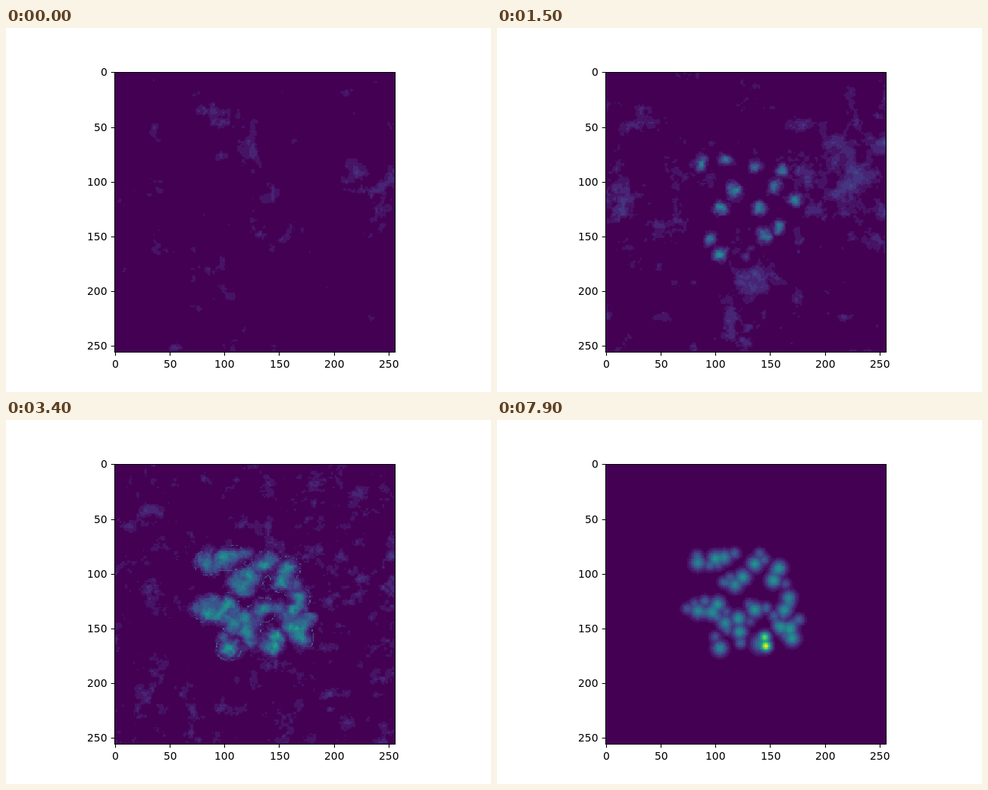
Animation, 640 px wide and 480 px high, one loop 8 s. Source, as an HTML page with a canvas:

```html
<!DOCTYPE html>
<html lang="en">
<head>
<meta charset="utf-8">
<title>Heatmap</title>
<style>
  html, body { margin: 0; width: 100%; height: 100%; overflow: hidden; background: #fff; }
  canvas { position: absolute; left: 143.2px; top: 57.6px; width: 369.6px; height: 369.6px; image-rendering: pixelated; }
  svg { position: absolute; left: 0; top: 0; }
  text { font: 13.89px "DejaVu Sans", sans-serif; fill: #000; }
  path { fill: none; stroke: #000; stroke-width: 1.11; }
</style>
</head>
<body>
<canvas id="map" width="256" height="256"></canvas>
<svg id="axes" width="640" height="480" viewBox="0 0 640 480"></svg>
<script>
const N = 256, STEP = 100, LOOP = 8000;

const palette = ('440154 471365 482475 463480 414487 3b528b 355f8d 2f6c8e 2a788e 25848e 21918c ' +
  '1e9c89 22a884 2fb47c 44bf70 5ec962 7ad151 9bd93c bddf26 dfe318 fde725')
  .split(' ').map(hex => [0, 2, 4].map(i => parseInt(hex.slice(i, i + 2), 16)));

function randomizer(seed) {
  return () => {
    seed = (seed + 0x6d2b79f5) | 0;
    let h = Math.imul(seed ^ (seed >>> 15), 1 | seed);
    h = (h + Math.imul(h ^ (h >>> 7), 61 | h)) ^ h;
    return ((h ^ (h >>> 14)) >>> 0) / 4294967296;
  };
}

// Layered value noise with zero mean and unit deviation
function cloud(seed, scale) {
  const random = randomizer(seed), field = new Float32Array(N * N);
  const ease = u => u * u * (3 - 2 * u);
  for (let wave = scale, weight = 1; wave > 1.5; wave /= 2, weight *= 0.7) {
    const size = Math.ceil(N / wave) + 2;
    const grid = Float32Array.from({ length: size * size }, () => random() + random() - 1);
    for (let y = 0; y < N; y++) {
      const gy = y / wave, row = Math.floor(gy), v = ease(gy - row);
      for (let x = 0; x < N; x++) {
        const gx = x / wave, col = Math.floor(gx), u = ease(gx - col), i = row * size + col;
        const top = grid[i] + (grid[i + 1] - grid[i]) * u;
        const low = grid[i + size] + (grid[i + size + 1] - grid[i + size]) * u;
        field[y * N + x] += weight * (top + (low - top) * v);
      }
    }
  }
  const mean = field.reduce((a, b) => a + b, 0) / field.length;
  const dev = Math.sqrt(field.reduce((a, b) => a + (b - mean) ** 2, 0) / field.length);
  return field.map(v => (v - mean) / dev);
}

const warpX = cloud(71, 14), warpY = cloud(72, 14);

// Soft union of round spots [x, y, radius, height], displaced by the warp fields
function spots(list, rough) {
  const field = new Float32Array(N * N);
  for (const [cx, cy, r, height = 1] of list) {
    const reach = Math.ceil(2 * r + 3 * rough);
    const left = Math.max(0, Math.floor(cx - reach)), right = Math.min(N, cx + reach);
    for (let y = Math.max(0, Math.floor(cy - reach)); y < Math.min(N, cy + reach); y++) {
      for (let x = left; x < right; x++) {
        const i = y * N + x;
        const dx = x - cx + rough * warpX[i], dy = y - cy + rough * warpY[i];
        field[i] += height ** 3 * Math.exp(-3 * (dx * dx + dy * dy) / (r * r));
      }
    }
  }
  return field.map(Math.cbrt);
}

// Spots strung evenly along a polyline
function stroke(points) {
  const list = [[...points[0], 6, .4]];
  points.slice(1).forEach(([x, y], k) => {
    const [x0, y0] = points[k], count = Math.ceil(Math.hypot(x - x0, y - y0) / 6);
    for (let s = 1; s <= count; s++) {
      const u = s / count;
      list.push([x0 + (x - x0) * u, y0 + (y - y0) * u, 6, .36 + .06 * Math.sin(5 * u + y)]);
    }
  });
  return list;
}

const random = randomizer(9);

const cores = [
  [84, 90], [100, 86], [108, 85], [136, 91], [158, 95], [125, 103], [118, 110], [153, 106],
  [167, 122], [163, 133], [102, 128], [97, 135], [84, 134], [136, 133], [109, 145], [121, 141],
  [122, 153], [104, 168], [160, 149], [168, 150], [170, 159]
].map(([x, y]) => [x, y, 6.5, .44 + .1 * random()]);
const satellites = Array.from({ length: 36 }, () => {
  const [x, y] = cores[Math.floor(random() * cores.length)];
  const angle = 2 * Math.PI * random(), distance = 6 + 6 * random();
  return [x + distance * Math.cos(angle), y + distance * Math.sin(angle), 5, .22 + .12 * random()];
});
const settled = [...cores, ...satellites, [145, 158, 5, .82], [146, 166, 5, 1], [141, 164, 8, .4]];
const swollen = settled.map(([x, y, r, height]) => [x, y, r + 1, Math.min(height, .66)]);

const sparks = [
  [87, 83], [109, 80], [136, 84], [161, 90], [154, 104], [118, 107], [104, 123],
  [139, 125], [145, 151], [157, 141], [95, 151], [104, 166], [172, 116]
].map(([x, y]) => [x, y, 5.5, .37 + .12 * random()]);

const strokes = [
  [[85, 84], [93, 82]], [[103, 80], [111, 81]], [[122, 92], [117, 109], [101, 131]],
  [[137, 80], [138, 88]], [[165, 89], [152, 106]], [[140, 122], [146, 153], [162, 140]],
  [[174, 116]]
].flatMap(stroke);

const lateNoise = cloud(15, 14);

// Haze shows where noise, raised inside the areas, exceeds the cut
const keys = [
  { time: 0, noise: cloud(11, 18), cut: 2, gain: 2.3,
    areas: [[10, 113, 15], [246, 112, 20], [213, 92, 20], [152, 145, 16], [90, 40, 14]] },
  { time: 1000, noise: cloud(12, 16), cut: 2.05, gain: 1.7, shapes: strokes, rough: 1.3,
    areas: [[45, 212, 28], [60, 15, 24], [235, 192, 24], [175, 20, 20], [95, 238, 18]] },
  { time: 1500, noise: cloud(13, 16), cut: 1.65, gain: 2.9, shapes: sparks, rough: 1.3,
    areas: [[4, 108, 28], [228, 95, 46], [130, 190, 22], [50, 140, 20], [110, 235, 16]] },
  { time: 2200, noise: cloud(14, 16), cut: 1.9, gain: 2.1, shapes: sparks, rough: 1.8,
    areas: [[105, 38, 34], [20, 205, 24], [140, 190, 28], [238, 200, 32], [115, 238, 20]] },
  { time: 3400, noise: lateNoise, cut: 1.05, shapes: swollen, rough: 1.6, outlined: true },
  { time: 5000, noise: lateNoise, cut: 1.25, shapes: settled, rough: .4 },
  { time: 5400, noise: lateNoise, cut: 6, shapes: settled },
  { time: LOOP, noise: lateNoise, cut: 6, shapes: settled }
].map(({ time, noise, cut, gain = 0, areas = [], shapes = [], rough = 0, outlined }) => {
  const shape = spots(shapes, rough).map((v, i) => v * (1 + .05 * rough * noise[i]));
  if (outlined) addOutline(shape);
  return { time, noise, shape, bias: spots(areas, 4).map(v => v * gain - cut) };
});

// Broken dotted contour around the whole cluster
function addOutline(field) {
  const hull = spots(cores.map(([x, y]) => [x, y, 10]), 0);
  for (let i = N; i < hull.length - N; i++) {
    const edge = hull[i] > .25 && Math.min(hull[i - 1], hull[i + 1], hull[i - N], hull[i + N]) <= .25;
    if (edge && warpX[i] > -.3 && random() < .6) field[i] = Math.max(field[i], .33);
  }
}

const context = document.getElementById('map').getContext('2d');
const image = context.createImageData(N, N);

function draw(time) {
  const next = keys.findIndex(key => key.time > time);
  const from = keys[next - 1], to = keys[next];
  const w = (time - from.time) / (to.time - from.time), rest = 1 - w;
  const norm = from.noise === to.noise ? 1 : 1 / Math.hypot(w, rest);
  for (let i = 0; i < N * N; i++) {
    const mix = name => from[name][i] * rest + to[name][i] * w;
    const haze = mix('noise') * norm + mix('bias');
    const value = Math.max(mix('shape'), haze > 0 ? .051 + .045 * haze : 0);
    const color = palette[Math.min(20, Math.floor(value * 20 + .15))];
    image.data.set(color, 4 * i);
    image.data[4 * i + 3] = 255;
  }
  context.putImageData(image, 0, 0);
}

function drawAxes() {
  const snap = v => Math.floor(v + .5) + .5;
  const digit = 8.84;
  let path = 'M143.5 58.5H513.5V427.5H143.5Z', labels = '';
  const label = (x, y, value) => { labels += `<text x="${Math.round(x)}" y="${Math.round(y)}">${value}</text>`; };
  for (let value = 0; value <= 250; value += 50) {
    const offset = (value + .5) * 369.6 / N, x = 143.2 + offset, y = 57.6 + offset;
    const width = digit * String(value).length;
    path += `M${snap(x)} 427.5v4.86M143.5 ${snap(y)}h-4.86`;
    label(x - width / 2 + .3, 448, value);
    label(133.8 - width, y + 5.1, value);
  }
  document.getElementById('axes').innerHTML = `<path d="${path}"/>${labels}`;
}

let shown = -1;
function tick() {
  const time = Math.floor(performance.now() % LOOP / STEP) * STEP;
  if (time !== shown) draw(shown = time);
  requestAnimationFrame(tick);
}

drawAxes();
tick();
</script>
</body>
</html>
```
